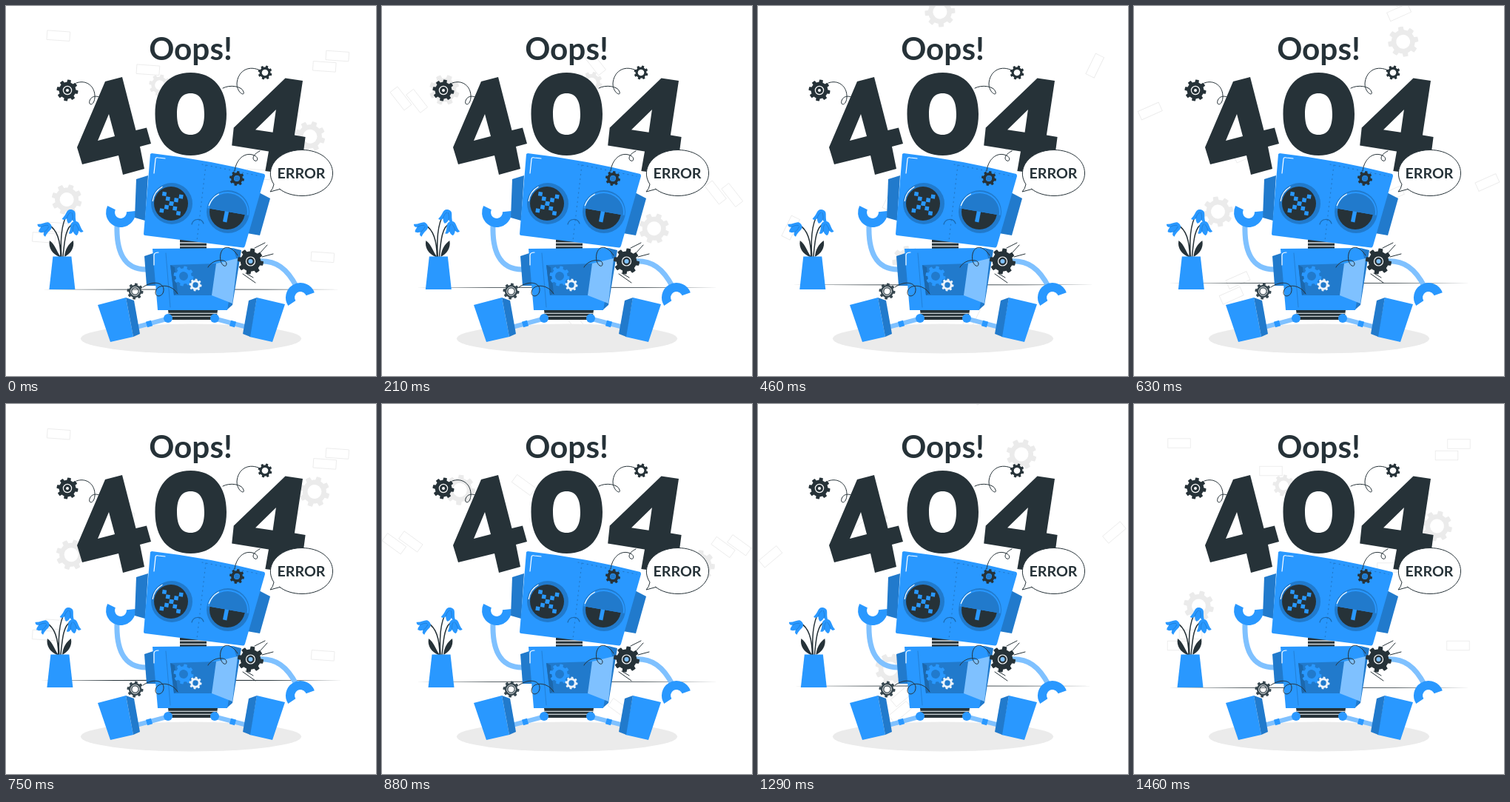
These frames come from a looping animation (500 px wide and 500 px high, 1.5 s). An HTML page with a canvas:

```html
<!DOCTYPE html>
<html lang="en">
<head>
<meta charset="utf-8">
<title>404 error</title>
<style>
html, body { margin: 0; width: 100%; height: 100%; overflow: hidden; background: #fff; }
canvas { display: block; width: 100vw; height: 100vh; }
</style>
</head>
<body>
<canvas id="stage"></canvas>
<script>
const canvas = document.getElementById('stage');
const ctx = canvas.getContext('2d');
const LOOP = 1500;
const BLUE = '#2998ff', SHADE = '#217acc', DEEP = '#1c68ad', LIGHT = '#7fc1ff';
const INK = '#263238', PALE = '#ebebeb', WHITE = '#fff';
const CENTER = { x: 249.5, y: 190 };
const TAU = Math.PI * 2, RAD = Math.PI / 180;

function fill(d, color) {
  ctx.fillStyle = color;
  ctx.fill(new Path2D(d), 'evenodd');
}

function line(d, color = INK, width = 1, cap = 'round') {
  ctx.strokeStyle = color;
  ctx.lineWidth = width;
  ctx.lineCap = cap;
  ctx.stroke(new Path2D(d));
}

function ellipse(x, y, rx, ry, color) {
  ctx.beginPath();
  ctx.ellipse(x, y, rx, ry, 0, 0, TAU);
  ctx.fillStyle = color;
  ctx.fill();
}

const disc = (x, y, r, color) => ellipse(x, y, r, r, color);

function arc(x, y, r, from, to, color, width, cap = 'round') {
  ctx.beginPath();
  ctx.arc(x, y, r, from * RAD, to * RAD);
  ctx.strokeStyle = color;
  ctx.lineWidth = width;
  ctx.lineCap = cap;
  ctx.stroke();
}

function at(x, y, degrees, draw) {
  ctx.save();
  ctx.translate(x, y);
  ctx.rotate(degrees * RAD);
  draw();
  ctx.restore();
}

function gear(x, y, r, hole, color, turn = 0) {
  const teeth = 8, step = TAU / teeth, body = r * 0.78;
  at(x, y, turn, () => {
    ctx.beginPath();
    for (let i = 0; i < teeth; i++) {
      const a = i * step;
      ctx.arc(0, 0, body, a - step / 2, a - step * 0.3);
      ctx.arc(0, 0, r, a - step * 0.21, a + step * 0.21);
      ctx.arc(0, 0, body, a + step * 0.3, a + step / 2);
    }
    ctx.closePath();
    ctx.moveTo(hole, 0);
    ctx.arc(0, 0, hole, 0, TAU);
    ctx.fillStyle = color;
    ctx.fill('evenodd');
  });
}

function label(text, x, y, size) {
  ctx.font = `700 ${size}px Lato, "Open Sans", sans-serif`;
  ctx.textAlign = 'center';
  ctx.fillStyle = INK;
  ctx.fillText(text, x, y);
}

// Linear interpolation through evenly spaced stops.
function stops(values, p) {
  const pos = p * (values.length - 1);
  const i = Math.min(Math.floor(pos), values.length - 2);
  return values[i] + (values[i + 1] - values[i]) * (pos - i);
}

// 36 held pictures per loop, each falling on a 60 Hz tick.
function progress(ms) {
  const step = Math.ceil((Math.floor(ms / 10) + 0.5) * 6 / 25) - 1;
  return ((1 + Math.floor(2.55 * step)) / 90) % 1;
}

const bricks = [[61, 53], [185, 90.5], [439, 54], [422.5, 69.5], [60.5, 326.5],
  [76.5, 311.5], [438, 326.5], [344, 221]];

function backdrop(p) {
  at(CENTER.x, CENTER.y, 360 * p, () => {
    ctx.translate(-CENTER.x, -CENTER.y);
    ctx.strokeStyle = PALE;
    ctx.lineWidth = 0.9;
    for (const [x, y] of bricks) ctx.strokeRect(x - 15.25, y - 6.25, 30.5, 12.5);
    gear(87.5, 273, 20.5, 9.5, PALE, 14);
    gear(202, 110, 14.5, 6.5, PALE, 10);
    gear(409.5, 165, 20.5, 9.5, PALE, 14);
  });
}

function ground(p) {
  const y = stops([383.2, 373.2, 383.2], p);
  fill(`M46 ${y} Q250 ${y - 1.1} 454 ${y} Q250 ${y + 1.1} 46 ${y}Z`, INK);
  ellipse(250, 449.5, 149, 20, PALE);
}

function tulip(x, y, angle) {
  at(x, y, angle, () => {
    fill('M-1 -9 C-8 -8 -5 -1 -10 6 C-7 8 -5 6 -4 4 C-3 8 -1 10 0 10 C1 10 3 8 4 4 C5 6 7 8 10 6 C5 -1 8 -8 1 -9Z', BLUE);
    line('M-4 4 C-4 0 -3 -3 -1 -5 M4 4 C4 1 3 -2 1 -5', SHADE, 0.7);
  });
}

function plant(p) {
  ctx.save();
  ctx.translate(stops([0, -1, 2, -4, 4, -4, 4, -4, 2, -1, 0], p), 0);
  line('M74 340 C74 318 69 302 58 296 M75 340 C73 310 76 287 87 277', INK, 1.5);
  line('M77 340 C79 320 80 299 91 294', INK, 1.5);
  fill('M74 339 C68 331 67 323 59 317 C57 327 63 335 72 339Z', INK);
  fill('M79 339 C80 329 84 322 91 317 C93 327 87 335 79 339Z', INK);
  tulip(87, 284, 14);
  tulip(53, 300, 58);
  tulip(94, 300, -8);
  fill('M63.5 338.5 H88.5 L93.5 383 H58.5Z', BLUE);
  ctx.restore();
}

// The digit 4 with its upper right corner at the origin, leaning left.
const four = 'M-23 6 L0 0 L18.5 72 L33 68.5 L39 90 L24 94 L30 124 L1 132 L-5 106 L-54 118 L-61 95Z M-33 86 L-18 50 L-10 80Z';

function digits() {
  at(157, 96, 0, () => fill(four, INK));
  at(401, 101, 23, () => fill(four, INK));
  fill('M249.5 90 C280 90 298 111 298 146 C298 181 280 202 249.5 202 C219 202 201.5 181 201.5 146 C201.5 111 219 90 249.5 90Z M249.5 118 C237 118 231 128 231 146 C231 164 237 174 249.5 174 C262 174 268 164 268 146 C268 128 262 118 249.5 118Z', INK);
  label('Oops!', 249.5, 73, 42.3);
}

function limbs() {
  line('M150 296 C149 328 157 357 191 356', LIGHT, 7, 'butt');
  line('M340 345 C365 343 380 355 393 380', LIGHT, 7, 'butt');
  arc(155, 279, 14, -6, 207, BLUE, 12, 'butt');
  arc(398, 394, 14, 147, 340, BLUE, 12, 'butt');

  line('M217 423 L176 434 M284 423 L326 434', LIGHT, 6, 'butt');
  line('M197 428.5 L190 430.5 M303 428.5 L310 430.5', BLUE, 8, 'butt');
  fill('M219 411 H286 L284 424 H221Z', INK);
  line('M220 415.3 H286 M220 419.4 H285', '#c9d1d5', 1.2, 'butt');
  disc(219, 422, 6, BLUE);
  disc(282, 422, 6, BLUE);

  fill('M124 404 L162 394 L172 447 L141 454Z', BLUE);
  fill('M162 394 L173 398 L181 443 L172 447Z', SHADE);
  fill('M339 394 L377 403 L360 454 L329 447Z', BLUE);
  fill('M339 394 L328 398 L320 443 L330 447Z', SHADE);
}

function body() {
  fill('M235 316 H271 V329 H235Z', INK);
  line('M235 320 H271 M235 324.5 H271', '#d6dcdf', 1.5, 'butt');

  fill('M199 334 L187 338 L190 378 L204 378Z', SHADE);
  fill('M306 327 L318 330 L306 404 L298 411Z', SHADE);
  fill('M198 328 L307 327 L311 340 L299 411 H205Z', BLUE);
  line('M216 334 L222 407', SHADE, 0.8);
  line('M200 350 V337 Q200 333 206 333', WHITE, 1.2);

  fill('M222 350 L285 348 L279 391 L227 391Z', SHADE);
  fill('M222 350 L227 391 L232 388 L228 353Z', DEEP);
  gear(240, 365, 13.5, 6, BLUE, 12);
  gear(256, 377, 8.5, 3.7, '#eaf2fa', 8);
  fill('M284 348 L313 341 L306 402 L278 391Z', LIGHT);
}

function eyes() {
  disc(224, 267, 28, SHADE);
  disc(223, 267, 23, INK);
  arc(224, 267, 26, 188, 240, WHITE, 1.2);
  at(223.5, 267, 9, () => {
    ctx.fillStyle = BLUE;
    for (let i = -2; i <= 2; i++) {
      ctx.fillRect(i * 5.7 - 2.75, i * 5.7 - 2.75, 5.5, 5.5);
      ctx.fillRect(i * 5.7 - 2.75, -i * 5.7 - 2.75, 5.5, 5.5);
    }
  });

  disc(300, 278, 29, SHADE);
  disc(299, 278, 24, INK);
  at(297, 285, 11, () => {
    ctx.fillStyle = BLUE;
    ctx.fillRect(-2.7, -8, 5.4, 15);
  });
  at(300, 278, 10, () => {
    fill('M-28 0 A28 27 0 0 1 28 0Z', BLUE);
    fill('M-26 0 A26 25 0 0 1 26 0Z', SHADE);
  });
  arc(300, 278, 27, 198, 242, WHITE, 1.2);
}

function head() {
  fill('M192 229 L176 234 L174 286 L188 290Z', SHADE);
  fill('M336 249 L357 260 L343 310 L320 306Z', SHADE);
  fill('M197 199 Q275 208 349 227 Q350 228 350 230 L323 324 Q322 327 320 326.5 L188 310 Q186 310 186 308 L195 200Z', BLUE);
  line('M200 226 L202 207 Q202 204 206 205 L215 206', WHITE, 1.2);
  ctx.setLineDash([1.2, 5]);
  line('M270 215 L258 317 M265 214 L344 230', SHADE, 1.2);
  ctx.setLineDash([]);
  eyes();
  line('M251 295 C253 287 264 286 267 294', DEEP, 1.2);
}

// A dark gear with a thin light ring around its dotted middle.
function ringGear(x, y, r, ring, dot, dotColor) {
  gear(x, y, r, 0, INK, 10);
  arc(x, y, ring, 0, 360, WHITE, 1.2);
  disc(x, y, dot, dotColor);
}

function springs() {
  line('M95 104 C108 99 121 108 120 124 C119 135 111 135 113 128 C115 122 121 121 126 123');
  ringGear(83, 114, 14.5, 5.6, 2, WHITE);

  line('M341 86 C326 80 313 89 312 105 C312 117 323 123 321 116 C319 108 302 106 293 111');
  gear(350, 90, 9.5, 4.3, INK, 18);

  line('M309 223 C311 207 322 198 333 201 C342 203 341 211 336 209 C331 206 336 199 343 196');
  gear(312, 233, 10, 4, INK, 12);
  disc(312, 233, 3.6, SHADE);

  line('M313 337 C304 323 293 323 290 335 C287 349 298 356 298 348 C297 341 279 342 273 353');
  ringGear(330.5, 345, 17.5, 6, 3, LIGHT);
  line('M336 327 L350 320 M343 334 L353 323 M346 339 L361 335 M320 362 L337 374 M324 361 L334 367', INK, 1);

  line('M185 380 C196 372 211 372 213 382 C214 393 202 395 202 387 C203 375 224 375 232 389');
  gear(174.5, 385.5, 11, 4, '#37474f', 8);
  arc(174.5, 385.5, 5.8, 0, 360, WHITE, 0.9);
}

function bubble() {
  const d = 'M370 247.5 L357 251 Q361 247 362 241 C348 220 367 194.5 400 194.5 C424 194.5 441.5 208 441.5 226 C441.5 244 423 256.5 400 256.5 C388 256.5 377 253 370 247.5Z';
  fill(d, WHITE);
  line(d, INK, 1);
  label('ERROR', 399, 233, 19.7);
}

function render(ms) {
  const p = progress(ms);
  const scaleX = canvas.width / 500, scaleY = canvas.height / 500;
  ctx.setTransform(scaleX, 0, 0, scaleY, 0, 0);
  ctx.fillStyle = WHITE;
  ctx.fillRect(0, 0, 500, 500);
  backdrop(p);
  ground(p);
  plant(p);
  limbs();
  body();
  digits();
  head();
  springs();
  bubble();
}

function resize() {
  const ratio = window.devicePixelRatio || 1;
  canvas.width = Math.round(innerWidth * ratio);
  canvas.height = Math.round(innerHeight * ratio);
}

const start = performance.now();
function tick() {
  render((performance.now() - start) % LOOP);
  requestAnimationFrame(tick);
}

addEventListener('resize', resize);
resize();
tick();
</script>
</body>
</html>
```
